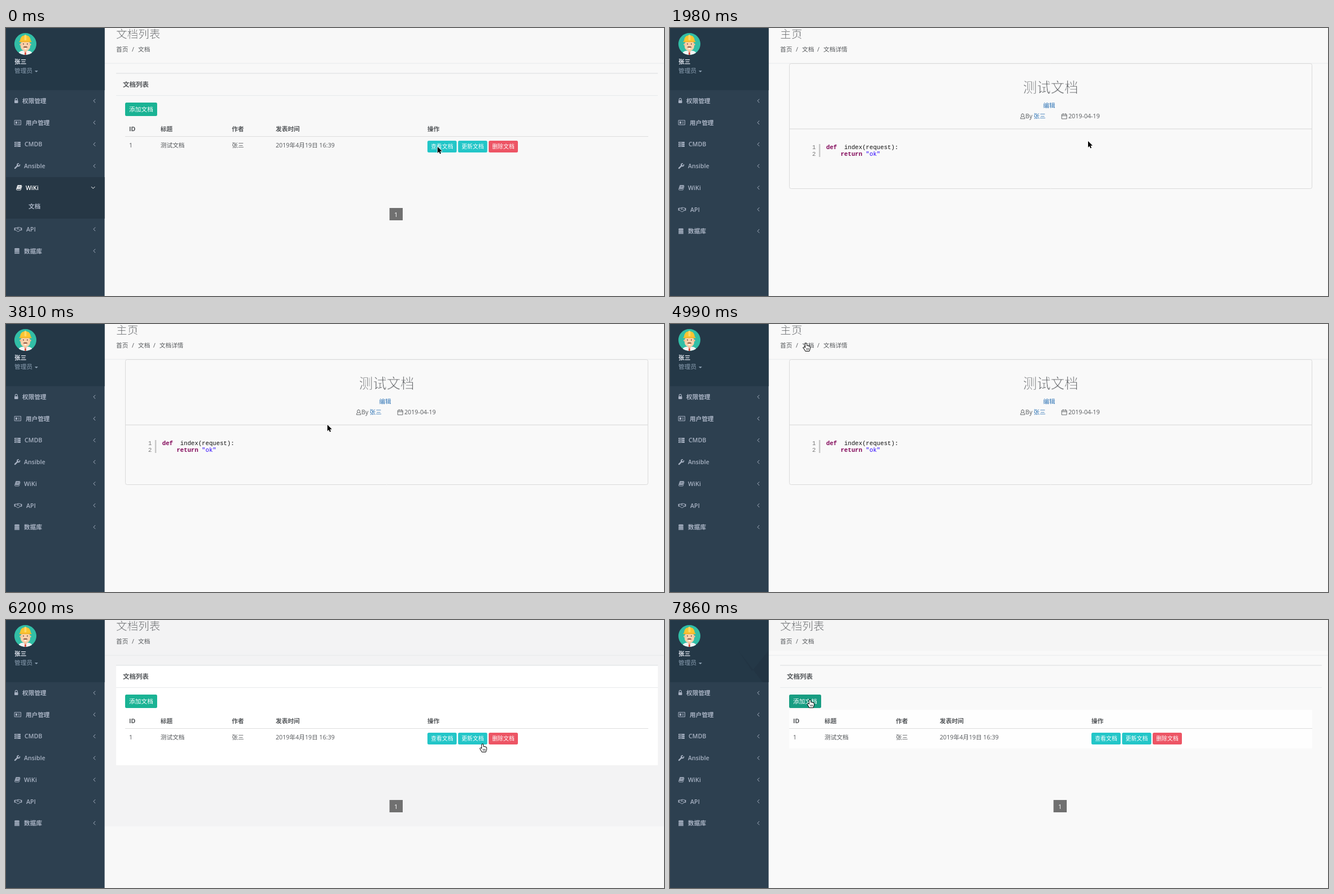
Recreate the animation shown at these times as an HTML page with a canvas. Size 1171x478 px, loop 8000 ms.

```html
<!DOCTYPE html>
<html lang="zh-CN">
<head>
<meta charset="utf-8">
<style>
html, body { margin: 0; width: 100%; height: 100%; overflow: hidden; background: #f8f8f8; }
canvas { display: block; }
</style>
</head>
<body>
<canvas id="stage" width="1171" height="478"></canvas>
<script>
const ctx = document.getElementById('stage').getContext('2d');
const LOOP = 8000;
const SANS = '"Open Sans", "Noto Sans CJK SC", "Noto Sans CJK", sans-serif';
const MONO = '"Liberation Mono", monospace';
const INK = '#55585b', MENU = '#a7b1c2', LINK = '#2f74b5', BASE = 10.7;

function text(s, x, y, { size = BASE, color = INK, weight = 400, family = SANS, align = 'left' } = {}) {
  ctx.font = `${weight} ${size}px ${family}`;
  ctx.fillStyle = color;
  ctx.textAlign = align;
  ctx.fillText(s, x, y);
}
// Hairline lettering: the paper colour eats into the glyph edges
function thinText(s, x, y, size, paper, align) {
  text(s, x, y, { size, weight: 100, align, color: '#606366' });
  ctx.strokeStyle = paper;
  ctx.lineWidth = size * .032;
  ctx.lineJoin = 'round';
  ctx.strokeText(s, x, y);
}
function rect(x, y, w, h, color, r = 0) {
  ctx.fillStyle = color;
  ctx.beginPath();
  ctx.roundRect(x, y, w, h, r);
  ctx.fill();
}
function circle(x, y, r, color) {
  ctx.fillStyle = color;
  ctx.beginPath();
  ctx.arc(x, y, r, 0, 7);
  ctx.fill();
}
function shape(d, x, y, fill, stroke, width = 1) {
  ctx.save();
  ctx.translate(x, y);
  const p = new Path2D(d);
  ctx.lineWidth = width;
  ctx.lineJoin = ctx.lineCap = 'round';
  if (stroke) { ctx.strokeStyle = stroke; ctx.stroke(p); }
  if (fill) { ctx.fillStyle = fill; ctx.fill(p); }
  ctx.restore();
}

// Pointer legs: start, end, number of steps, destination
const legs = [
  [800, 1680, 7, 781, 212],
  [1980, 2780, 6, 552, 147],
  [2930, 2930, 1, 551, 147],
  [3080, 3380, 3, 696, 207],
  [3530, 3960, 4, 446, 150],
  [4110, 4110, 1, 467, 155],
  [4260, 4690, 4, 238, 34],
  [4990, 4990, 1, 242, 34],
  [5430, 6200, 6, 848, 221],
  [6350, 6350, 1, 830, 213],
  [6500, 6830, 3, 643, 163],
  [7120, 7860, 6, 249, 142]
];
function pointerAt(t) {
  let x = 767, y = 211;
  for (const [from, to, steps, toX, toY] of legs) {
    if (t < from) break;
    const step = t >= to ? steps : 1 + Math.floor((t - from) / (to - from) * (steps - 1));
    x += (toX - x) * step / steps;
    y += (toY - y) * step / steps;
  }
  return { x: Math.round(x), y: Math.round(y) };
}

const buttons = [
  { label: '添加文档', x: 212, y: 133, w: 57, h: 24, size: BASE, color: '#1ab394', hot: '#189d82' },
  { label: '查看文档', x: 750, y: 201, w: 52, h: 21, size: 9.9, color: '#23c6c8', hot: '#1fadaf' },
  { label: '更新文档', x: 804.5, y: 201, w: 52, h: 21, size: 9.9, color: '#23c6c8', hot: '#1fadaf' },
  { label: '删除文档', x: 859, y: 201, w: 52, h: 21, size: 9.9, color: '#ed5565', hot: '#d94b5a' }
];
const crumbLink = { x: 234, y: 30, w: 23, h: 15 };
const inside = (p, b) => p.x >= b.x && p.x < b.x + b.w && p.y >= b.y && p.y < b.y + b.h;

const icons = {
  lock: c => { rect(15, -1, 6.5, 5, c, 1); shape('M1.3 0V-2A2 2 0 0 1 5.2 -2V0', 15, -1, null, c, 1.2); },
  card: c => {
    shape('M.5 -4H11.5V4H.5Z', 15, 0, null, c);
    rect(17, -2, 3, 4, c); rect(21.5, -1.5, 3, 1, c); rect(21.5, .8, 3, 1, c);
  },
  server: c => {
    for (const y of [-4.5, -1.2, 2.1]) { rect(15, y, 11, 2.6, c, .6); rect(16.5, y + .9, 5, .8, '#2f4050'); }
  },
  wrench: c => {
    shape('M1 4L6 -1', 15, 0, null, c, 2.4);
    shape('M9.5 -2.2A2.3 2.3 0 1 1 7.3 -4.3', 15, 0, null, c, 1.7);
  },
  book: c => {
    shape('M3 -4.3H9.6L7.6 2H1Z', 15, 0, c, c, .6);
    shape('M1 2Q-.3 4.2 1.4 4.2H8L10.2 -2.6', 15, 0, null, c, .9);
    shape('M4.2 -2.4H7.6M3.6 -.6H7', 15, 0, null, '#2f4050', .7);
  },
  hands: c => {
    rect(14.6, -2.5, 2, 4.6, c);
    rect(26.4, -2.5, 2, 4.6, c);
    shape('M1.5 -2.3H4L6 -3.2H8.6L11.5 -2.3M1.5 1.8H2.6L5.4 4Q7 4.6 8 3.6L10.2 1.9H11.5M7 -3L4.4 -.4Q5.8 1 7.2 -.9L10 1.8', 15, 0, null, c, 1);
  },
  data: c => {
    rect(15, -4.7, 9, 3, c, 1.5);
    for (const y of [-1.2, 1.1, 3.4]) rect(15, y, 9, 1.7, c, .9);
  }
};
const menu = [
  ['lock', '权限管理', 29], ['card', '用户管理', 35], ['server', 'CMDB', 33], ['wrench', 'Ansible', 32],
  ['book', 'WiKi', 32], ['hands', 'API', 36], ['data', '数据库', 32]
];

function avatar() {
  ctx.save();
  ctx.beginPath();
  ctx.arc(34.5, 28.5, 19.6, 0, 7);
  ctx.clip();
  rect(14, 8, 41, 41, '#32bea6');
  shape('M-14 21Q-13 13 -5 12H5Q13 13 14 21Z', 34.5, 28.5, '#f4f4f4');
  shape('M-4 10L0 17L4 10Z', 34.5, 28.5, '#efb791');
  shape('M0 14.5L-1.6 16L-1 21H1L1.6 16Z', 34.5, 28.5, '#d9493c');
  rect(26, 22, 17, 18.5, '#fbd0aa', 7.5);
  circle(26, 29.5, 1.8, '#f5bd94');
  circle(43, 29.5, 1.8, '#f5bd94');
  circle(31, 28.5, .9, '#443730');
  circle(38, 28.5, .9, '#443730');
  shape('M-4.2 6.2Q-2.5 3.6 0 4.4Q2.5 3.6 4.2 6.2Z', 34.5, 28.5, '#7a4a38');
  rect(32.8, 36, 3.4, 1.6, '#fff', .8);
  shape('M-9.5 -4Q-9.5 -15.5 0 -15.5Q9.5 -15.5 9.5 -4Z', 34.5, 28.5, '#fbc531');
  rect(32.7, 12, 3.6, 10, '#fdd968', 1.5);
  rect(23.5, 23, 22, 2.2, '#f3b62c', 1.1);
  ctx.restore();
}

function sidebar(open, pattern) {
  rect(0, 0, 175.5, 478, '#2d4050');
  rect(0, 0, 175.5, 111, '#243847');
  if (pattern) shape('M122 55L146 91L175 55V111H165Z', 0, 0, '#223443');
  avatar();
  text('张三', 15, 64, { color: '#dfe4ed', weight: 700 });
  text('管理员', 15, 80, { color: '#8b9fb2' });
  shape('M0 0H6L3 3Z', 51, 76, '#8b9fb2');
  if (open) {
    rect(0, 266, 175.5, 74, '#263745');
    text('文档', 40, 322, { color: MENU, weight: 600 });
  }
  menu.forEach(([icon, label, x], i) => {
    const active = open && i === 4;
    const y = 130 + i * 38.7 + (open && i > 4 ? 35.3 : 0);
    const color = active ? '#fff' : MENU;
    ctx.save();
    ctx.translate(active ? 3 : 0, y);
    icons[icon](color);
    text(label, x, 4, { color, weight: 600 });
    ctx.restore();
    shape(active ? 'M-4.5 -1.5L-1.5 1.5L1.5 -1.5' : 'M1.5 -3L-1.5 0L1.5 3', active ? 156.5 : 157.2, y, null, color);
  });
}

function heading(title, crumbs, paper) {
  thinText(title, 196, 18, 19.7, paper);
  crumbs.forEach(([label, x], i) => {
    text(label, x, 42);
    if (i) text('/', x - 11, 42);
  });
  rect(175, 62.5, 996, 1, '#e7eaec');
}

function listPage(t, p) {
  const fresh = t >= 5430 && t < 6500;
  const live = t >= 800 && !(t >= 6190 && t < 6350);
  const rowHot = live && p.x > 212 && p.y >= 194 && p.y < 229;
  if (fresh) {
    rect(175, 0, 996, 368, '#f3f3f4');
    rect(196, 81, 964, 178, '#fff');
  } else if (t >= 6500) {
    rect(175, 0, 996, 55, '#f5f5f5');
    rect(212, 160, 931, 69, '#fefefe');
  }
  heading('文档列表', [['首页', 196], ['文档', 235]], fresh ? '#f3f3f4' : t >= 6500 ? '#f5f5f5' : '#f8f8f8');
  rect(196, 80, 964, 1.5, '#e4e6e7');
  rect(196, 120, 964, 1, '#e7eaec');
  text('文档列表', 208, 105, { size: 11.5, weight: 600 });
  if (rowHot) rect(212, 194, 931, 34.5, '#ebebeb');
  rect(212, 193, 931, 1, '#dddddd');
  [['ID', '1', 219], ['标题', '测试文档', 275], ['作者', '张三', 402],
   ['发表时间', '2019年4月19日 16:39', 480], ['操作', '', 750]].forEach(([head, cell, x]) => {
    text(head, x, 183.5, { weight: 700 });
    text(cell, x, 212.5);
  });
  for (const b of buttons) {
    rect(b.x, b.y, b.w, b.h, live && inside(p, b) ? b.hot : b.color, 2.5);
    text(b.label, b.x + b.w / 2, b.y + b.h / 2 + b.size * .37, { size: b.size, color: '#fff', weight: 500, align: 'center' });
  }
  rect(682.5, 321, 23.5, 22, '#707070');
  text('1', 694, 337, { color: '#fff', align: 'center', size: 11.5 });
}

function detailPage() {
  heading('主页', [['首页', 196], ['文档', 235], ['文档详情', 273]], '#f9f9f9');
  ctx.strokeStyle = '#dadada';
  ctx.lineWidth = 1;
  ctx.beginPath();
  ctx.roundRect(212.5, 63.5, 930, 223, 3);
  ctx.stroke();
  rect(213, 179.5, 929, 1, '#d6d6d6');
  thinText('测试文档', 677.5, 114.5, 24.6, '#f9f9f9', 'center');
  text('编辑', 664, 141.5, { color: LINK });
  shape('M4 -4.5A2.5 2.7 0 1 1 4 .9A2.5 2.7 0 1 1 4 -4.5M2.2 .2Q.3 .8 .3 4.3H7.9Q7.9 .8 5.8 .2', 623.5, 157.5, null, INK, .9);
  text('By', 632.5, 161);
  text('张三', 647, 161, { color: LINK });
  shape('M.5 -3.5H9V4.5H.5ZM.5 -1H9M2.7 -5V-3M6.8 -5V-3', 697, 157.5, null, INK, .9);
  text('2019-04-19', 709, 161);

  const code = (s, x, y, color = '#111', weight = 400) => text(s, x, y, { color, weight, family: MONO });
  code('1', 253, 216, '#787878');
  code('2', 253, 227.5, '#787878');
  rect(265, 207, 2.5, 23, '#c8c8c8');
  code('def', 278, 216, '#7f0055', 700);
  code('index(request):', 310.1, 216);
  code('return', 303.7, 227.5, '#7f0055', 700);
  code('"ok"', 348.6, 227.5, '#2a00ff');
}

function pointer(p, hand) {
  if (hand) {
    shape('M-1 1.2Q0 -.4 1.2 1.2V5Q2.4 4.2 3.4 5.4Q4.6 4.8 5.4 6Q7 5.6 7 7.5V10L5.6 14H-.8L-4 8.8Q-4.4 7 -2.6 7.4L-1 9Z', p.x, p.y, '#fff', '#000', 1.8);
    shape('M1 9.3V12M2.9 9.3V12M4.8 9.3V12', p.x, p.y, null, '#000', .7);
  } else {
    shape('M0 0V11.2L2.5 8.9L4.2 12.8L6.1 12L4.5 8.1H8Z', p.x + 1, p.y + .7, '#000', '#fff', 1.4);
  }
}

function draw(t) {
  const p = pointerAt(t);
  const detail = t >= 1980 && t < 5430;
  rect(0, 0, 1171, 478, detail || t >= 6500 ? '#f9f9f9' : '#f8f8f8');
  if (detail) detailPage(); else listPage(t, p);
  sidebar(t < 1980, t >= 6500);
  const targets = detail ? [crumbLink] : buttons;
  pointer(p, t >= 290 && targets.some(b => inside(p, b)));
}

function tick() {
  draw(performance.now() % LOOP);
  requestAnimationFrame(tick);
}
tick();
</script>
</body>
</html>
```
